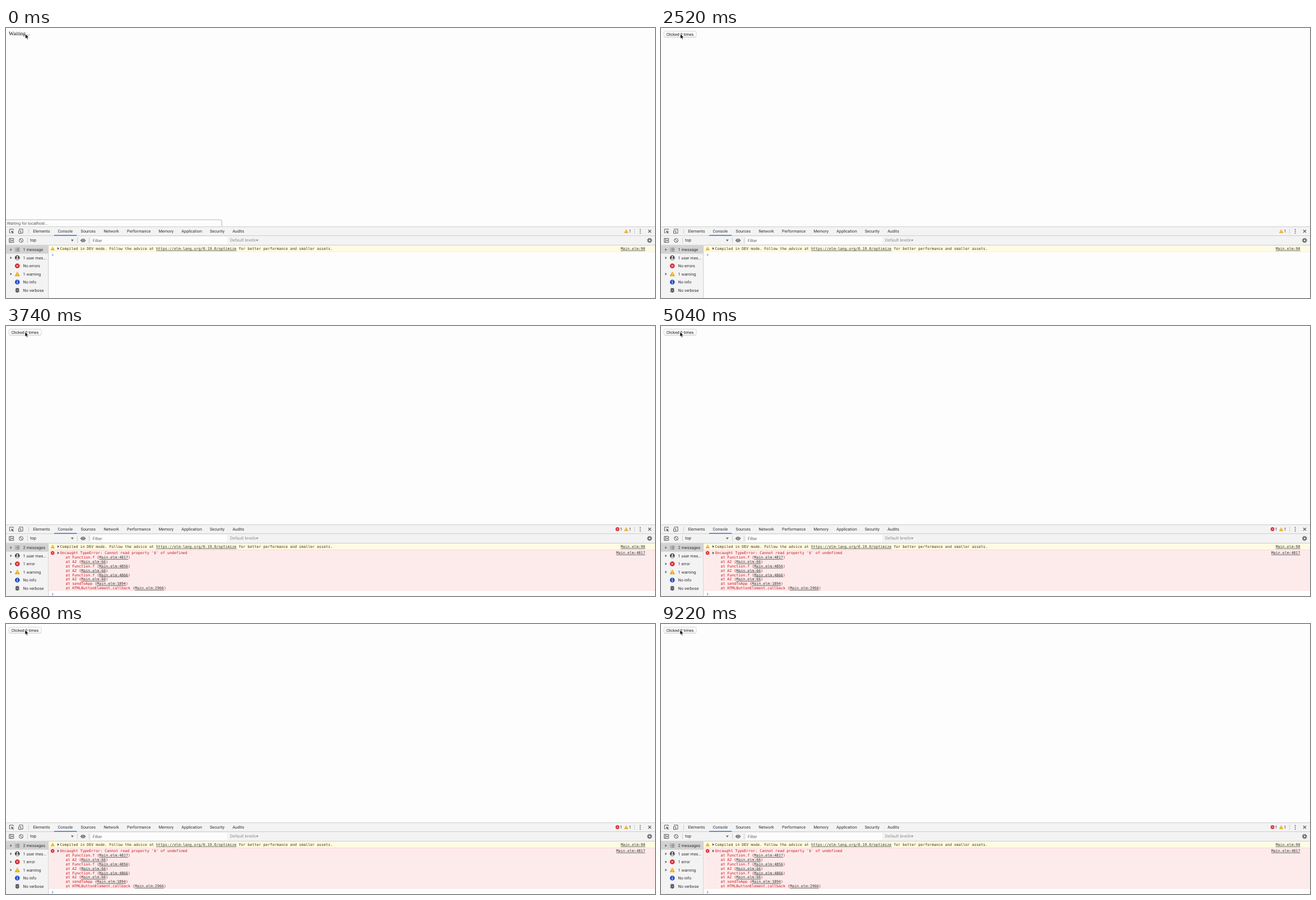
Recreate the animation shown at these times as an HTML page. Size 1159x483 px, loop 9.24 s.

```html
<!DOCTYPE html>
<html lang="en">
<head>
<meta charset="utf-8">
<title>Console</title>
<style>
  html, body { margin: 0; width: 100%; height: 100%; overflow: hidden; background: #fdfdfd; }
  svg { display: block; width: 1159px; height: 483px; text-rendering: geometricPrecision; }
  text { font: 7.3px Roboto, sans-serif; fill: #303030; white-space: pre; }
  .serif { font: 9.6px "Liberation Serif", serif; fill: #000; }
  .mono { font: 6.645px "DejaVu Sans Mono", monospace; }
  .link { text-decoration: underline; fill: #303030; }
  .end { text-anchor: end; }
  .brown { fill: #453500; }
  .red { fill: #c8141c; }
  .line { fill: none; stroke: #5a5a5a; stroke-width: 1; }
  .rule { stroke: #cdcdcd; stroke-width: 1; }
  .dark { fill: #5a5a5a; }
</style>
</head>
<body>
<svg id="stage" viewBox="0 0 1159 483" xmlns="http://www.w3.org/2000/svg">
  <defs>
    <g id="warn">
      <path d="M0-4 4.3 3.6H-4.3Z" fill="#e8a80c" stroke="#e8a80c" stroke-width=".6" stroke-linejoin="round"/>
      <path d="M0-1.5V1.2M0 2V2.9" stroke="#fff" stroke-width=".9"/>
    </g>
    <g id="fail">
      <circle r="4.3" fill="#d8262c"/>
      <path d="M-1.7-1.7 1.7 1.7M1.7-1.7-1.7 1.7" stroke="#fff" stroke-width="1"/>
    </g>
    <path id="right" d="M-1.5-2.4 1.7 0-1.5 2.4Z"/>
    <path id="down" d="M-2.4-1.4H2.4L0 1.8Z"/>
    <path id="prompt" d="M-1.3-2 1-.1-1.3 1.8" fill="none" stroke="#3f7de8" stroke-width="1"/>
  </defs>

  <rect width="1159" height="483" fill="#fdfdfd"/>
  <text id="waiting" class="serif" x="5" y="13.3">Waiting...</text>
  <g id="button">
    <rect x="5.2" y="6.4" width="57.8" height="10.3" rx="2.2" fill="#c9c9c9"/>
    <rect x="5.2" y="5.7" width="57.8" height="10.4" rx="2.2" fill="#fff" stroke="#c5c2d0" stroke-width=".7"/>
    <text x="9.4" y="13.6" style="font-size:7.2px;fill:#111">Clicked 0 times</text>
  </g>
  <g id="status">
    <path d="M-1 343H382.5Q385.5 343 385.5 346V355.5H-1Z" fill="#fdfdfd" stroke="#b4b4b4"/>
    <text x="1.4" y="351.6" style="font-size:7.4px;fill:#555">Waiting for localhost...</text>
  </g>

  <rect y="355.5" width="1159" height="33" fill="#f3f3f3"/>
  <path class="rule" d="M0 355.5H1159M0 371.5H1159M0 388.5H1159"/>
  <path class="rule" d="M40.5 359V368M1122.5 359V368M38.5 375V385M127.5 375V385M148.5 375V385"/>
  <g id="tabs"></g>
  <rect x="86" y="370.3" width="40.3" height="1.4" fill="#3367d6"/>

  <g class="line">
    <path d="M8.5 366.5H6.3V359.8H13V362"/>
    <path d="M23.5 361V359.7H30V367H27M22.5 362.7H26.3V367.4H22.5Z"/>
    <path d="M1147 361 1152 366M1152 361 1147 366" stroke-width="1.1"/>
    <path d="M5.8 376.4H13.6V383.6H5.8ZM8 376.4V383.6"/>
    <circle cx="27" cy="380" r="3.5"/>
    <path d="M24.6 377.6 29.4 382.4"/>
    <circle cx="1149.3" cy="380" r="2.5" stroke-width="1.6"/>
    <circle cx="1149.3" cy="380" r="3.8" stroke-width="1.3" stroke-dasharray="1.49 1.49"/>
  </g>
  <path class="dark" d="M9 362.5 14.3 364.5 12.2 365.2 14 367.2 13.2 368 11.4 366.1 10.6 368Z"/>
  <path class="dark" d="M11.8 378V382L9.2 380Z"/>
  <g class="dark">
    <circle cx="1132.6" cy="360.5" r=".9"/><circle cx="1132.6" cy="363.7" r=".9"/><circle cx="1132.6" cy="366.9" r=".9"/>
  </g>
  <path class="dark" d="M132.8 380Q137.6 373.3 142.4 380 137.6 386.7 132.8 380Z"/>
  <circle cx="137.6" cy="380" r="1.9" fill="#5a5a5a" stroke="#f3f3f3" stroke-width=".9"/>

  <text x="43" y="382.4" style="font-size:7.6px">top</text>
  <use href="#down" x="118.4" y="380" fill="#5a5a5a"/>
  <rect x="152" y="373.7" width="243" height="12.6" fill="#fdfdfd"/>
  <text x="154.7" y="382.6" style="font-size:7.6px;fill:#666">Filter</text>
  <text x="400" y="382.4" style="font-size:7.7px;fill:#929292">Default levels</text>
  <use href="#down" x="448.5" y="380" fill="#929292"/>

  <use href="#warn" transform="translate(1107.6 363.6) scale(.78)"/>
  <text x="1112.6" y="366.2">1</text>
  <g class="failed">
    <use href="#fail" transform="translate(1092 363.4) scale(.78)"/>
    <text x="1096.4" y="366.2">1</text>
  </g>

  <rect y="389" width="76" height="94" fill="#f3f3f3"/>
  <rect y="389.3" width="76" height="14.4" fill="#d2d2d2"/>
  <path class="rule" d="M75.8 389V483"/>
  <g id="side"></g>
  <g class="line">
    <path d="M16 394H17.2M18.3 394H24.2M16 396.5H17.2M18.3 396.5H24.2M16 399H17.2M18.3 399H24.2"/>
  </g>
  <circle cx="20.2" cy="411" r="4.3" fill="#444"/>
  <circle cx="20.2" cy="409.4" r="1.5" fill="#f3f3f3"/>
  <path d="M17.3 413.4Q20.2 410.2 23.1 413.4 20.2 415.6 17.3 413.4Z" fill="#f3f3f3"/>
  <use href="#fail" x="20.2" y="425.5"/>
  <use href="#warn" x="20.2" y="440.2"/>
  <circle cx="20.2" cy="454.5" r="4.3" fill="#2251c4"/>
  <path d="M20.2 451.8V452.9M20.2 453.8V457.2" stroke="#fff" stroke-width="1.1"/>
  <path d="M16.5 467H23.9M16.5 469.3H23.9M16.5 471.6H23.9M18 464.8 19.4 466.3M22.4 464.8 21 466.3" class="line" stroke-width=".9"/>
  <rect x="17.7" y="465.6" width="5" height="7.7" rx="2.4" fill="#444"/>
  <path d="M19 468.4H21.4M19 470.5H21.4" stroke="#f3f3f3" stroke-width=".8"/>

  <rect x="76.3" y="389" width="1083" height="11.4" fill="#fffbe3"/>
  <path d="M76.3 400.3H1159" stroke="#fbf0bd" stroke-width=".8"/>
  <use href="#warn" transform="translate(83.3 394.6) scale(.76)"/>
  <use href="#right" x="93.4" y="394.5" fill="#5a5a5a"/>
  <text class="mono brown" x="96.5" y="396.9">Compiled in DEV mode. Follow the advice at <tspan class="link">https://elm-lang.org/0.19.0/optimize</tspan> for better performance and smaller assets.</text>
  <text class="mono link end" x="1141.6" y="396.9">Main.elm:90</text>

  <g id="trace" class="failed">
    <rect x="76.3" y="400.8" width="1083" height="72" fill="#fdebeb"/>
    <path d="M76.3 400.8H1159M76.3 472.9H1159" stroke="#f8d3d3" stroke-width=".8"/>
    <use href="#fail" transform="translate(83.2 406) scale(.74)"/>
    <use href="#right" x="93.4" y="406" fill="#5a5a5a"/>
    <text class="mono red" x="96.5" y="408.3">Uncaught TypeError: Cannot read property '$' of undefined</text>
    <text class="mono link end" x="1141.6" y="408.3">Main.elm:4817</text>
  </g>
  <use id="caret" href="#prompt" x="83.3" y="405.9"/>

  <path id="cursor" d="M0 0V8.6L2 6.8 3.4 10 4.9 9.4 3.5 6.3H6.2Z" fill="#000" stroke="#fff" stroke-width=".7" stroke-linejoin="round"/>
</svg>
<script>
  const LOOP = 9240, STATUS_GONE = 560, READY = 1500, FAILED = 3400;
  const $ = id => document.getElementById(id);

  function add(parent, tag, attrs, content = '') {
    const el = document.createElementNS('http://www.w3.org/2000/svg', tag);
    for (const key in attrs) el.setAttribute(key, attrs[key]);
    el.textContent = content;
    parent.append(el);
    return el;
  }

  const tabs = {
    Elements: 48.2, Console: 92.6, Sources: 133.6, Network: 174.4, Performance: 216.1,
    Memory: 272.4, Application: 313.3, Security: 364, Audits: 404.4
  };
  for (const name in tabs) add($('tabs'), 'text', { x: tabs[name], y: 366.2 }, name);

  const rowY = i => 396.6 + i * 14.5;
  const labels = ['1 message', '1 user mes...', 'No errors', '1 warning', 'No info', 'No verbose']
    .map((label, i) => add($('side'), 'text', { x: 30.5, y: rowY(i) + 2.6 }, label));
  const addArrow = i => add($('side'), 'use', { href: '#right', x: 9, y: rowY(i), fill: '#6a6a6a' });
  [0, 1, 3].forEach(addArrow);
  addArrow(2).setAttribute('class', 'failed');

  const calls = [
    ['Function.f', 4817], ['A2', 66], ['Function.f', 4856], ['A2', 66],
    ['Function.f', 4866], ['A2', 66], ['sendToApp', 1894], ['HTMLButtonElement.callback', 2966]
  ];
  calls.forEach(([name, line], i) => {
    const row = add($('trace'), 'text', { class: 'mono red', x: 106.4, y: 416.1 + i * 7.85 }, `at ${name} (`);
    add(row, 'tspan', { class: 'link' }, `Main.elm:${line}`);
    row.append(')');
  });

  const show = (el, on) => { el.style.display = on ? '' : 'none'; };
  const errorParts = document.querySelectorAll('.failed');

  function draw(now) {
    const t = now % LOOP, ready = t >= READY, failed = t >= FAILED;
    show($('status'), t < STATUS_GONE);
    show($('waiting'), !ready);
    show($('button'), ready);
    errorParts.forEach(el => show(el, failed));
    labels[0].textContent = failed ? '2 messages' : '1 message';
    labels[2].textContent = failed ? '1 error' : 'No errors';
    $('caret').setAttribute('y', failed ? 480 : 405.9);
    $('cursor').setAttribute('transform', `translate(${failed ? 34 : 34.6} 10.6)`);
  }

  const start = performance.now();
  function tick() {
    draw(performance.now() - start);
    requestAnimationFrame(tick);
  }
  tick();
</script>
</body>
</html>
```
